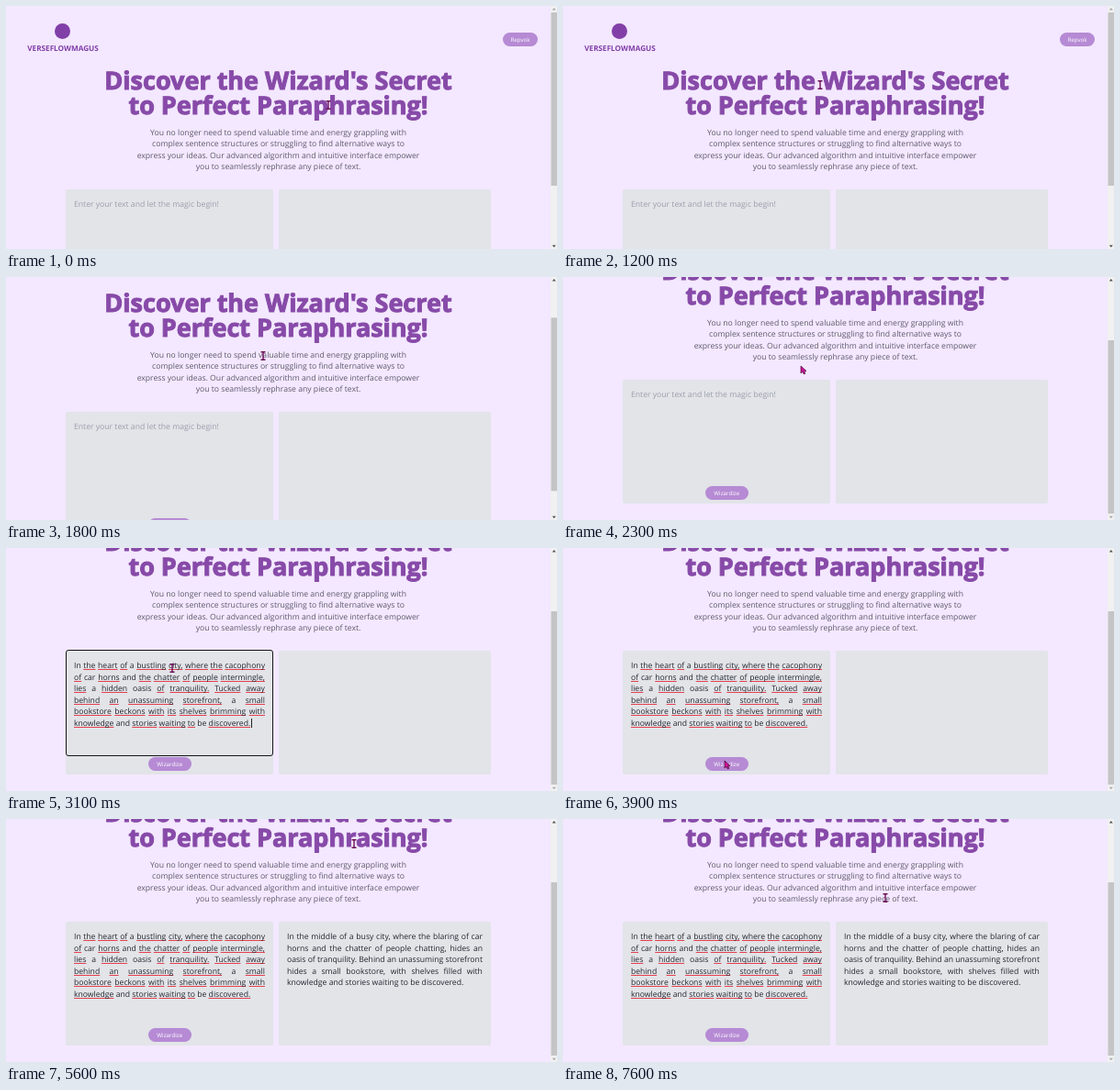
Write an HTML page that moves like this. It is 600 by 265 pixels and loops after 8.1 s.

```html
<!DOCTYPE html>
<html lang="en">
<head>
<meta charset="utf-8">
<title>Paraphrasing page</title>
<style>
html, body { margin: 0; width: 100%; height: 100%; overflow: hidden; background: #f3e8ff; }
#stage { position: relative; width: 600px; height: 265px; overflow: hidden; font: 8.63px/12.6px "Open Sans", sans-serif; text-rendering: geometricPrecision; }
#page { position: absolute; left: 0; top: 0; width: 593px; height: 353px; }
#page > *, #stage > svg { position: absolute; }
h1, p { margin: 0; left: 0; width: 593px; text-align: center; white-space: nowrap; }
h1 { top: 66.5px; font-size: 27px; font-weight: 700; line-height: 27px; color: #874aa8; -webkit-text-stroke: 1px #874aa8; }
p { top: 131.6px; color: #5f596b; }
.dot { left: 53px; top: 19px; width: 17px; height: 17px; border-radius: 50%; background: #823fa8; }
.brand { left: 12px; top: 41px; width: 100px; text-align: center; font-size: 8.2px; font-weight: 700; color: #823fa8; }
.pill { height: 15px; border-radius: 8px; background: #b68ad4; color: #fff; font-size: 6.2px; font-weight: 500; line-height: 15px; text-align: center; }
.box { top: 200px; height: 134.5px; border-radius: 2px; background: #e2e4e8; }
.text { top: 210px; color: #23262f; }
.line { display: flex; justify-content: space-between; height: 12.6px; white-space: nowrap; }
.line:last-child { justify-content: flex-start; gap: .26em; }
.bad { text-decoration: underline .8px #e5404f; text-underline-offset: 1.4px; text-decoration-skip-ink: none; }
#hint { left: 74px; top: 210px; color: #9a9fab; white-space: nowrap; }
#ring { left: 64.7px; top: 199px; width: 224.4px; height: 114.3px; border: 1.2px solid #15151a; border-radius: 3px; }
#caret { width: 1px; height: 10px; background: #222; }
</style>
</head>
<body>
<div id="stage">
  <div id="page">
    <div class="dot"></div>
    <div class="brand">VERSEFLOWMAGUS</div>
    <div class="pill" style="left:541px;top:29px;width:38px">Repvok</div>
    <h1>Discover the Wizard's Secret<br>to Perfect Paraphrasing!</h1>
    <p>You no longer need to spend valuable time and energy grappling with<br>complex sentence structures or struggling to find alternative ways to<br>express your ideas. Our advanced algorithm and intuitive interface empower<br>you to seamlessly rephrase any piece of text.</p>
    <div class="box" style="left:65px;width:226px"></div>
    <div class="box" style="left:297px;width:231px"></div>
    <div id="hint">Enter your text and let the magic begin!</div>
    <div id="input" class="text" style="left:74px;width:208px"></div>
    <div id="output" class="text" style="left:306px;width:213px"></div>
    <div id="ring"></div>
    <div id="caret"></div>
    <div class="pill" style="left:155px;top:316px;width:46.5px">Wizardize</div>
  </div>
  <svg width="600" height="265" style="left:0;top:0">
    <rect x="593" width="7" height="265" fill="#f1f1f1"/>
    <rect id="thumb" x="593.5" width="6.5" height="189" fill="#c4c4c6"/>
    <path id="up" d="M594.8 4.5l2-2.4 2 2.4z"/>
    <path id="down" d="M594.8 260.8l2 2.4 2-2.4z"/>
    <path id="beam" d="M-2.5-4.3H2.5M-2.5 4.3H2.5M0-4.3V4.3" fill="none" stroke="#6d0f58" stroke-width="1.4"/>
    <path id="arrow" d="M-2-4V4L0 2.3 1.3 5 2.8 4.3 1.6 1.8 4 1.6Z" fill="#cf129a" stroke="#43092f" stroke-width=".7"/>
  </svg>
</div>
<script>
const LOOP = 8100, STEP = 100, MAX_SCROLL = 88;
const $ = id => document.getElementById(id);

const scrollPath = [[0, 0], [1600, 0], [1700, 18], [1800, 53], [1900, 80], [2000, MAX_SCROLL]];
const mousePath = [
  [0, 351, 108], [800, 351, 108], [1200, 280, 86], [2100, 280, 86], [2300, 261, 101],
  [2700, 181, 131], [3100, 181, 131], [3700, 178, 236], [4000, 178, 236],
  [4800, 266, 146], [4900, 275, 138], [5600, 379, 27], [7400, 379, 27], [7600, 351, 86]
];

const before = `In the heart of a bustling city, where the cacophony
of car horns and the chatter of people intermingle,
lies a hidden oasis of tranquility. Tucked away
behind an unassuming storefront, a small
bookstore beckons with its shelves brimming with
knowledge and stories waiting to be discovered.`;
const after = `In the middle of a busy city, where the blaring of car
horns and the chatter of people chatting, hides an
oasis of tranquility. Behind an unassuming storefront
hides a small bookstore, with shelves filled with
knowledge and stories waiting to be discovered.`;
const accepted = new Set(["In", "a", "car", "and", "oasis", "be"]);

function fill(box, text, checked) {
  for (const row of text.split("\n")) {
    const line = document.createElement("div");
    line.className = "line";
    for (const word of row.split(" ")) {
      const span = document.createElement("span");
      span.textContent = word;
      if (checked && !accepted.has(word)) span.className = "bad";
      line.append(span);
    }
    box.append(line);
  }
}

function sample(path, t) {
  const i = path.findIndex(p => p[0] > t);
  if (i < 0) return path[path.length - 1].slice(1);
  const [a, b] = [path[i - 1], path[i]];
  const k = (t - a[0]) / (b[0] - a[0]);
  return a.slice(1).map((v, n) => v + (b[n + 1] - v) * k);
}

const show = (id, on) => { $(id).style.visibility = on ? "visible" : "hidden"; };

function draw(t) {
  const [scroll] = sample(scrollPath, t);
  const [x, y] = sample(mousePath, t);
  $("page").style.transform = `translateY(${-scroll}px)`;
  $("thumb").setAttribute("y", 7 + scroll * 0.705);
  $("up").setAttribute("fill", scroll > 0 ? "#505050" : "#a8a8a8");
  $("down").setAttribute("fill", scroll < MAX_SCROLL ? "#505050" : "#a8a8a8");

  const pasted = t >= 3100, focused = t >= 2700 && t < 3900;
  show("hint", !pasted);
  show("input", pasted);
  show("output", t >= 5300);
  show("ring", focused);
  show("caret", focused);
  $("caret").style.left = (pasted ? 267 : 74) + "px";
  $("caret").style.top = (pasted ? 274 : 211) + "px";

  const offText = scroll === MAX_SCROLL && (y > 93 && y < 111 || y > 228);
  show("beam", !offText);
  show("arrow", offText);
  for (const id of ["beam", "arrow"]) $(id).setAttribute("transform", `translate(${x} ${y})`);
}

fill($("input"), before, true);
fill($("output"), after, false);

const start = performance.now();
function tick() {
  const t = (performance.now() - start) % LOOP;
  draw(Math.floor(t / STEP) * STEP);
  requestAnimationFrame(tick);
}
tick();
</script>
</body>
</html>
```
